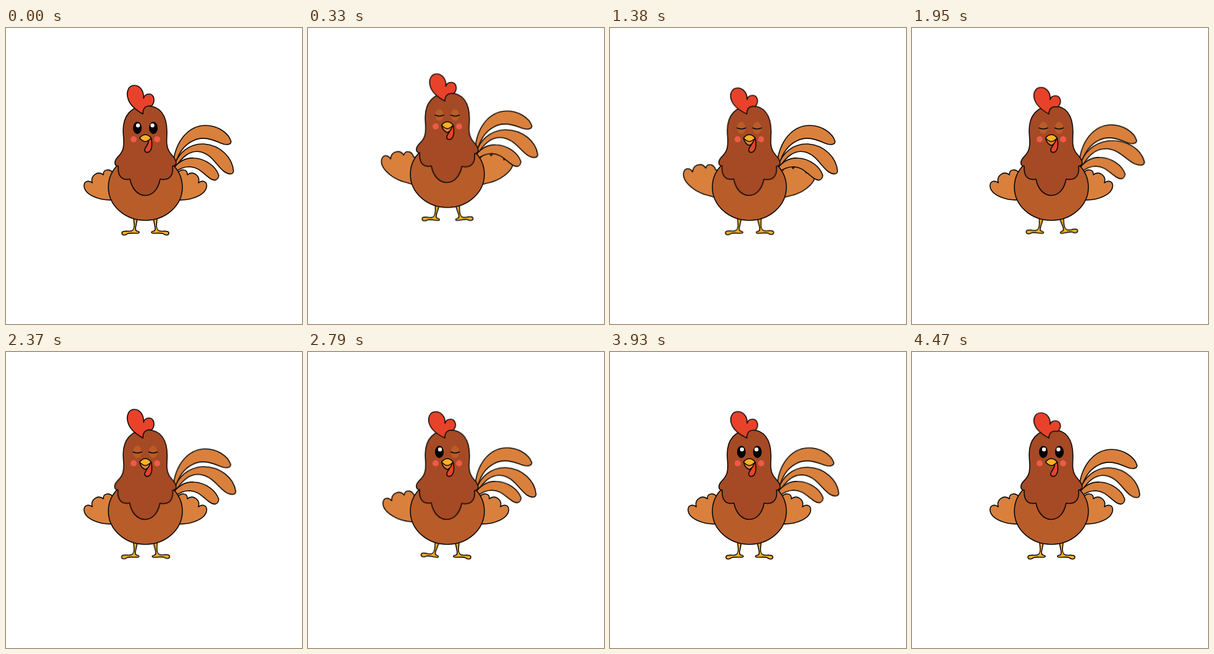
An HTML page for the animation above (4.5 s loop, 480 by 480 pixels).

```html
<!DOCTYPE html>
<html lang="en">
<head>
<meta charset="utf-8">
<title>Rooster</title>
<style>
html, body { margin: 0; width: 100%; height: 100%; overflow: hidden; background: #fff; }
svg { display: block; width: 100vw; height: 100vh; }
.line { stroke: #0b0806; stroke-width: 1.6; stroke-linejoin: round; stroke-linecap: round; }
.head { fill: #a54a25; }
.body { fill: #b85c2a; }
.plume { fill: #d9803d; }
.red { fill: #e8432a; }
.gold { fill: #fbb123; }

.move { animation: 4.5s ease-in-out infinite; }
.step { animation: 4.5s step-end infinite; }

#bird { animation-name: jump; }
@keyframes jump {
  0%, 19.6%, 100% { transform: translateY(0); }
  9.8% { transform: translateY(-24px); }
}

#wingL { transform-origin: 188px 225px; animation-name: wingL; }
@keyframes wingL {
  0%, 14.6%, 22.6%, 39.5%, 53.3%, 64.6%, 100% { transform: rotate(0deg); }
  6.9%, 31.5%, 59.8% { transform: rotate(20deg); }
}
#wingR { transform-origin: 264px 225px; animation-name: wingR; }
@keyframes wingR {
  0%, 18.4%, 22.6%, 39.5%, 66.6%, 84%, 100% { transform: rotate(0deg); }
  7.5%, 31.1%, 75.3% { transform: rotate(-18deg); }
}

.feather { transform-origin: 273px 222px; }
#tail1 { animation-name: tail1; }
@keyframes tail1 {
  0%, 20%, 30.6%, 47%, 77%, 100% { transform: rotate(0deg); }
  9%, 38%, 61.5%, 89% { transform: rotate(-3deg); }
}
#tail2 { animation-name: tail2; }
@keyframes tail2 {
  0%, 31%, 59.5%, 83.3%, 100% { transform: rotate(0deg) scale(1); }
  16.4%, 44.4%, 71%, 95.5% { transform: rotate(-8deg) scale(1.08, .95); }
}
#tail3 { animation-name: tail3; }
@keyframes tail3 {
  0%, 31%, 52%, 76%, 100% { transform: rotate(0deg); }
  14%, 42%, 62%, 88% { transform: rotate(-2deg); }
}

#legL { transform-origin: 210px 305px; animation-name: legL; }
@keyframes legL {
  0%, 24.4%, 28%, 50%, 82%, 100% { transform: rotate(0deg); }
  11% { transform: rotate(8deg); }
  38%, 62% { transform: rotate(10deg); }
}
#legR { transform-origin: 242px 305px; animation-name: legR; }
@keyframes legR {
  0%, 23.5%, 58%, 100% { transform: rotate(0deg); }
  11%, 43.3% { transform: rotate(-10deg); }
}

#head { transform-origin: 226px 195px; animation-name: tilt; }
@keyframes tilt {
  0%, 43.3%, 88%, 100% { transform: rotate(0deg) scaleX(1); }
  14.7% { transform: rotate(1.7deg) scaleX(1.02); }
  30.6% { transform: rotate(.5deg) scaleX(1); }
  62% { transform: rotate(1deg) scaleX(1.01); }
  75.3% { transform: rotate(-.5deg) scaleX(1); }
}
#comb { transform-origin: 222px 139.5px; animation-name: comb; }
@keyframes comb {
  0% { transform: rotate(0deg) scaleY(1); }
  14.7% { transform: rotate(2deg) scaleY(.89); }
  23% { transform: rotate(0deg) scaleY(1); }
  30.6% { transform: rotate(-2deg) scaleY(.92); }
  36% { transform: rotate(0deg) scaleY(1); }
  43.3% { transform: rotate(2deg) scaleY(.92); }
  52% { transform: rotate(0deg) scaleY(1); }
  62% { transform: rotate(-2deg) scaleY(.93); }
  75.3% { transform: rotate(1deg) scaleY(.92); }
  81% { transform: rotate(0deg) scaleY(1); }
  86% { transform: rotate(-2deg) scaleY(.92); }
  91% { transform: rotate(0deg) scaleY(1); }
  99.5%, 100% { transform: rotate(2deg) scaleY(.87); }
}

.lid, #jaw { opacity: 0; }
#lidL { animation-name: lidL; }
@keyframes lidL { 0% { opacity: 0; } 3.4% { opacity: 1; } 52.7%, 100% { opacity: 0; } }
#lidR { animation-name: lidR; }
@keyframes lidR { 0% { opacity: 0; } 3.4% { opacity: 1; } 68.7%, 100% { opacity: 0; } }
#jaw { animation-name: jaw; }
@keyframes jaw { 0% { opacity: 0; } 3.4% { opacity: 1; } 88.7%, 100% { opacity: 0; } }
</style>
</head>
<body>
<svg viewBox="0 0 480 480">
  <defs>
    <path id="wing" class="plume line" d="M200 277L176 278.500C151 281 126.500 270 126.500 255C127 248 134 246.500 140 251C136.500 239 149 231 158 238C157 228 169 228 174 235.500L190 232Z"/>
    <path id="leg" class="gold line" d="M206.500 304L208 319.500C208 326.500 206 329.500 200 329.500C195 329.500 188 328.500 188 332.500C188 337 194 336.500 197 333.500C202 331.500 211 333.500 215 332.500C217 331.500 216 329.500 213 329.500C209.500 329.500 209.500 324.500 211 319.500L214 304Z"/>
    <ellipse id="eye" cy="162" rx="7" ry="10"/>
    <g id="lid">
      <ellipse class="body" cy="162" rx="7" ry="10"/>
      <path class="line" fill="none" d="M-7 162Q0 165.500 7 162"/>
    </g>
  </defs>
  <g id="bird" class="move">
    <g id="wingL" class="move"><use href="#wing"/></g>
    <g id="wingR" class="move"><use href="#wing" transform="matrix(-1 0 0 1 452 0)"/></g>

    <g class="plume line">
      <path id="tail1" class="feather move" d="M271 219C275 183 296 158 324 158C343 158 361 170 365 184C365 190 356 190 349 187C333 180 319 175 303 183C288 190 280 203 275 219Z"/>
      <path id="tail2" class="feather move" d="M273 223C279 203 297 187 321 188C348 190 367 210 369 232C368 239 360 237 354 233C341 223 335 206 316 201C297 197 285 211 275 225Z"/>
      <path id="tail3" class="feather move" d="M272 227C281 216 293 210 305 211C324 212 341 225 345 239C344 248 337 248 331 244C319 236 314 226 298 225C287 225 281 229 275 233Z"/>
    </g>

    <g id="legL" class="move"><use href="#leg"/></g>
    <g id="legR" class="move"><use href="#leg" transform="matrix(-1 0 0 1 452 0)"/></g>
    <ellipse class="body line" cx="226" cy="258" rx="60" ry="54"/>

    <g id="head" class="move">
      <path class="head line" d="M226 126C250 125 261 142 261 168C261 180 259 190 264 199C268 207 276 211 276 219C275 223 272 224 270 224C272 239 265 248 250 245C247 261 238 271.500 226 271.500C213 271.500 204 260 201 245C187 248 181 239 182 224C177 224 176 220 177 216C179 209 186 207 189 198C193 188 190 178 190 166C190 142 203 127 226 126Z"/>
    </g>
    <path id="comb" class="red line move" d="M222 139.500C222 129 227 125 236 126.500C243 119 240 107 232 107C227 107 224 110 223 114C224 102 217 93 208 93C198 93 194.500 105 198 115C201 125 209.500 132.500 222 139.500Z"/>

    <use href="#eye" x="213"/><use href="#eye" x="239"/>
    <g fill="#fff"><circle cx="214" cy="158" r="3.200"/><circle cx="237.500" cy="158" r="3.200"/></g>
    <g id="lidL" class="lid step"><ellipse class="head" cx="213" cy="162" rx="7.500" ry="10.500"/><use href="#lid" x="213"/></g>
    <g id="lidR" class="lid step"><ellipse class="head" cx="239" cy="162" rx="7.500" ry="10.500"/><use href="#lid" x="238.500"/></g>
    <g fill="#ee5b47"><circle cx="207" cy="180.500" r="5"/><circle cx="245" cy="180.500" r="5"/></g>

    <path class="red line" d="M235.500 179C237.500 187 237 197 232.500 200.500C228 203.500 223.500 200.500 225.500 195.500C228 190 232 188 231 181Z"/>
    <path id="jaw" class="line step" fill="#f0803a" d="M217 180Q219 188 226 190.500Q232 188 234 180Z"/>
    <path class="gold line" d="M216.500 178.500C220 174 223 173 226 173C229 173 232 174 235.500 178.500C232 182 229 184 226 184C223 184 220 182 216.500 178.500Z"/>
  </g>
</svg>
</body>
</html>
```
